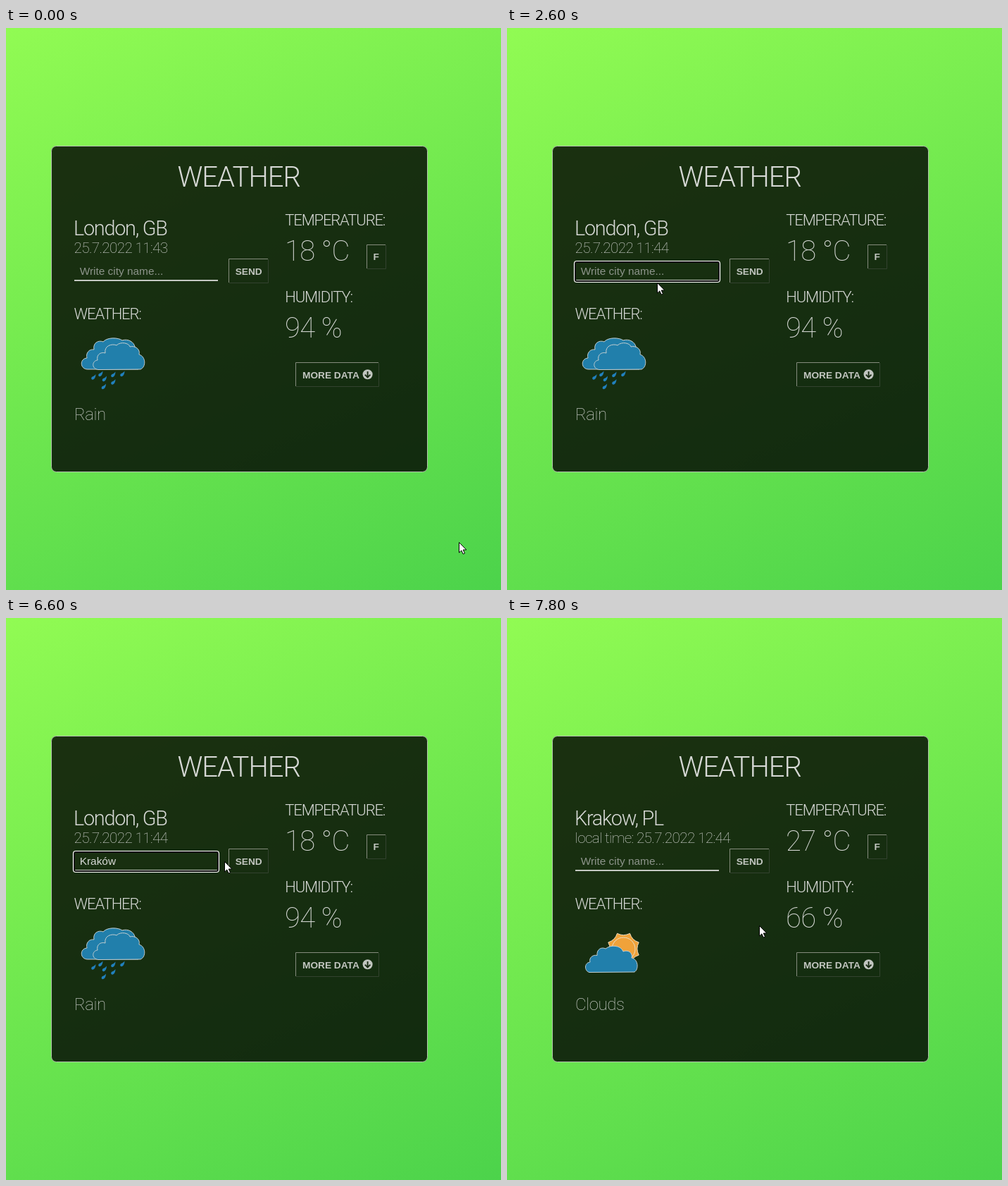
Animation, 703 px wide and 797 px high, one loop 8000 ms. Source, as an HTML page:

```html
<!DOCTYPE html>
<html lang="en">
<head>
<meta charset="utf-8">
<title>Weather</title>
<style>
  html, body { margin: 0; width: 100%; height: 100%; overflow: hidden; }
  body { background: linear-gradient(155deg, #91fb53, #4cd34b); }
  svg { display: block; position: absolute; left: 0; top: 0; }
  text { fill: #d6d8d5; white-space: pre; }
  .head, .thin { font-family: Roboto, sans-serif; font-weight: 300; letter-spacing: -1px; }
  .label { font-size: 22px; font-weight: 350; letter-spacing: -1.15px; }
  .city { font-size: 28.8px; font-weight: 350; letter-spacing: -1.25px; }
  .title { font-size: 40px; }
  .big { font-size: 40px; font-weight: 130; letter-spacing: -.55px; }
  .date { font-size: 20.8px; font-weight: 200; letter-spacing: -.65px; }
  .sky { font-size: 24px; font-weight: 200; letter-spacing: -.4px; }
  .field { font: 15.4px "Liberation Sans", Arial, sans-serif; }
  .hint { fill: #8d948b; }
  .btn text { font: bold 13.7px "Liberation Sans", Arial, sans-serif; fill: #c2c6c0; }
  .btn rect { fill: none; }
  .lit { fill: none; stroke: #858c7d; }
  .dim { fill: none; stroke: #33422f; }
  .hover rect { fill: #dcdedb; }
  .hover text { fill: #26332a; }
  .hover path { stroke: #dcdedb; }
  .ring rect { fill: none; stroke: #fff; stroke-width: 1.2; }
  .ring .inner { stroke: #101010; stroke-width: 2; }
  .cloud { fill: #217fab; stroke: #c3ced0; stroke-width: 1; }
  .sun { fill: #f0a23a; stroke: #e9dcc4; stroke-width: 1; }
  .pointer path { fill: #fff; stroke: #000; stroke-width: 1; stroke-linejoin: round; }
</style>
</head>
<body>
<svg width="703" height="797" viewBox="0 0 703 797">
  <defs>
    <path id="drop" d="M3.4-4.600C3.600-1 1.600 3.200-1 3.200C-3.500 3-3.200 0-1.400-.9C.4-1.800 2-2.800 3.400-4.600Z" fill="#2180bd"/>
  </defs>
  <rect x="64.500" y="167.500" width="534" height="462" rx="7" fill="#000" fill-opacity=".8" stroke="#b4c2ae"/>

  <text class="head title" x="243.500" y="225">WEATHER</text>
  <text class="head label" x="396.300" y="280">TEMPERATURE:</text>
  <text class="head label" x="396.300" y="389">HUMIDITY:</text>
  <text class="head label" x="96.500" y="413">WEATHER:</text>

  <g data-on="0-7100">
    <text class="head city" x="96" y="294">London, GB</text>
    <text class="thin big" x="396" y="330">18 °C</text>
    <text class="thin big" x="396" y="439">94 %</text>
    <text class="thin sky" x="97" y="556">Rain</text>
    <path class="cloud" d="M116 484C105 484 104 469 115 468C113 461 118 455 125 456C123 447 131 442 138 445C144 438 160 439 165 443C174 440 182 446 183 452L188 484Z"/>
    <path class="cloud" d="M131 484.500C121 483 122 472 130 471C128 463 135 459 141 461C139 451 150 447 157 450C163 444 175 447 176 452C184 450 191 456 189 463C199 466 199 481 191 484Z"/>
    <g id="rain"></g>
  </g>
  <text class="thin date" x="96.500" y="319" data-on="0-600">25.7.2022 11:43</text>
  <text class="thin date" x="96.500" y="319" data-on="600-7330">25.7.2022 11:44</text>
  <text class="thin date" x="96.500" y="319" data-on="7330-8000">local time: 25.7.2022 12:44</text>
  <g data-on="7100-8000">
    <text class="head city" x="96" y="294">Krakow, PL</text>
    <text class="thin big" x="396" y="330">27 °C</text>
    <text class="thin big" x="396" y="439">66 %</text>
    <text class="thin sky" x="97" y="556">Clouds</text>
    <path id="rays" class="sun"/>
    <circle class="sun" cx="165.500" cy="469.500" r="16.500"/>
    <path class="cloud" d="M117 502.500C110 501 109 489 118 488C116 482 122 477 128 478.500C127 470 134 466 140 469C147 463 162 464 165 473C172 470 179 475 177 482C187 484 187 499 181 502Z"/>
  </g>

  <path d="M97 358H301" stroke="#c4c8c2" stroke-width="2"/>
  <g class="ring" data-on="2000-6800">
    <rect class="inner" x="97" y="332" width="204" height="27" rx="2"/>
    <rect x="95.500" y="330.500" width="207" height="30" rx="3.500"/>
  </g>
  <text class="field hint" id="hint" x="104.700" y="350">Write city name...</text>
  <text class="field" id="typed" x="104.700" y="350"></text>
  <rect id="caret" y="336" width="1" height="17" fill="#d6d8d5"/>

  <g class="btn" data-box="316 327 57 35"><text x="325.700" y="350">SEND</text></g>
  <g class="btn" data-box="512 307 28 35"><text x="521.500" y="329">F</text></g>
  <g class="btn" data-box="411 474 119 35">
    <text x="421" y="497">MORE DATA</text>
    <circle cx="513.600" cy="491.300" r="7" fill="#c2c6c0"/>
    <path d="M513.600 487V495M509.800 491.600L513.600 495.400L517.400 491.600" fill="none" stroke="#182b13" stroke-width="1.900"/>
  </g>

  <g class="pointer" id="pointer">
    <path data-kind="arrow" d="M.5.500V15L3.800 11.900L6.200 17L8.500 16L6.200 11H10.800Z"/>
    <path data-kind="beam" style="fill:none;stroke:#c9cdc7" d="M-3-6.500H-1L.5-5.500L2-6.500H4M.5-5.500V5.500M-3 6.500H-1L.5 5.500L2 6.500H4"/>
    <path data-kind="hand" d="M-1.500 1C-1.500-1 1.500-1 1.500 1V6C2-.1 4.500 5 4.500 6.500C5 5.300 7 5.600 7 7.200C8 6.300 9.500 7 9.500 8.500V13C9.500 15 8 16 8 19H-.5C-.5 17-5.500 13-5.500 10.500C-5.500 8.800-3.300 8.700-1.500 11.500Z"/>
  </g>
</svg>
<script>
  const LOOP = 8000, BLINK = 530, SENT = 7100;
  const $ = id => document.getElementById(id);
  const all = sel => [...document.querySelectorAll(sel)];
  const show = (el, on) => { el.style.display = on ? "" : "none"; };

  // pointer path: time, x, y
  const path = [
    [0, 643, 729], [270, 643, 729], [400, 655, 716], [700, 560, 610], [1070, 327, 428],
    [1470, 282, 372], [1730, 187, 357], [2350, 187, 357], [2580, 213, 361], [6270, 213, 361],
    [6330, 219, 359], [6700, 343, 340], [6870, 350, 337], [7150, 350, 337],
    [7300, 390, 360], [7450, 398, 396], [7800, 358, 436], [8000, 358, 436]
  ];
  const word = "Kraków", keyTimes = [3730, 4000, 4270, 4470, 4730, 4800];

  const drops = [[124, 495.5], [134, 491], [139.5, 498], [152, 492], [165, 491], [152, 502.5], [138.5, 509]];
  $("rain").innerHTML = drops.map(([x, y]) => `<use href="#drop" x="${x}" y="${y}"/>`).join("");

  const spoke = (r, deg) => {
    const a = deg * Math.PI / 180;
    return `${165.5 + r * Math.cos(a)} ${469 + r * Math.sin(a)}`;
  };
  let rays = "M" + spoke(23.5, 22.5);
  for (let a = 45; a <= 360; a += 45) rays += `Q${spoke(17, a)} ${spoke(23.5, a + 22.5)}`;
  $("rays").setAttribute("d", rays + "Z");

  const buttons = all(".btn").map(el => {
    const box = el.dataset.box.split(" ").map(Number), [x, y, w, h] = box;
    el.insertAdjacentHTML("afterbegin",
      `<rect x="${x}" y="${y}" width="${w}" height="${h}" rx="2"/>
       <path class="dim" d="M${x + w - .5} ${y + 1}V${y + h - .5}H${x + 1}"/>
       <path class="lit" d="M${x + .5} ${y + h - 1}V${y + .5}H${x + w - 1}"/>`);
    return { el, box };
  });

  const spans = all("[data-on]").map(el => [el, ...el.dataset.on.split("-").map(Number)]);
  const kinds = all("[data-kind]");
  const inside = (p, [x, y, w, h]) => p[0] >= x && p[0] < x + w && p[1] >= y && p[1] < y + h;

  function pointerAt(t) {
    const i = path.findIndex(p => p[0] > t), [t0, x0, y0] = path[i - 1], [t1, x1, y1] = path[i];
    const k = (t - t0) / (t1 - t0);
    return [Math.round(x0 + (x1 - x0) * k), Math.round(y0 + (y1 - y0) * k)];
  }

  function draw(t) {
    for (const [el, from, to] of spans) show(el, t >= from && t < to);

    const p = pointerAt(t);
    let kind = inside(p, [97, 330, 204, 30]) ? "beam" : "arrow";
    for (const { el, box } of buttons) {
      const over = inside(p, box);
      el.classList.toggle("hover", over);
      if (over) kind = "hand";
    }
    for (const el of kinds) show(el, el.dataset.kind === kind);
    $("pointer").setAttribute("transform", `translate(${p})`);

    const count = t < SENT ? keyTimes.filter(k => k <= t).length : 0;
    $("typed").textContent = word.slice(0, count);
    show($("hint"), !count);

    const since = t - (count ? keyTimes[count - 1] : 2060);
    show($("caret"), since >= 0 && t < 6800 && Math.floor(since / BLINK) % 2 === 0);
    $("caret").setAttribute("x", Math.floor(105 + (count ? $("typed").getComputedTextLength() : 0)));
  }

  const start = performance.now();
  function tick() {
    draw((performance.now() - start) % LOOP);
    requestAnimationFrame(tick);
  }
  draw(0);
  requestAnimationFrame(tick);
</script>
</body>
</html>
```
